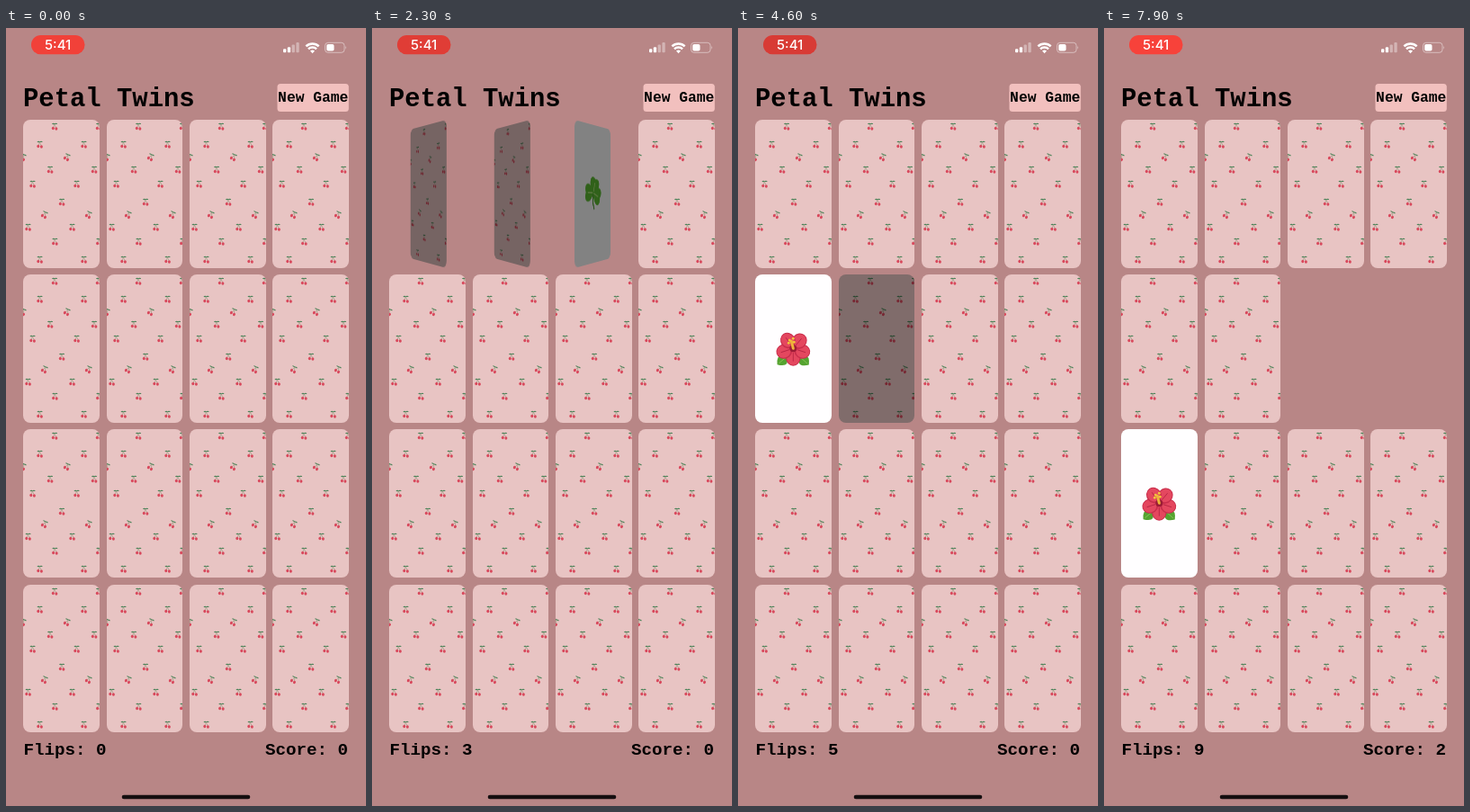
These frames come from a looping animation (400x865 px, 8000 ms). An HTML page:

```html
<!DOCTYPE html>
<html lang="en">
<head>
<meta charset="utf-8">
<title>Petal Twins</title>
<style>
  html, body { margin: 0; width: 100%; height: 100%; overflow: hidden; background: #b88686; }
  #stage { position: absolute; left: 0; top: 0; width: 400px; height: 865px; overflow: hidden; background: #b88686; }
  svg { display: block; }
  .hud { position: absolute; left: 0; top: 0; }
  .hud text { font-family: "Courier New", "Liberation Mono", monospace; font-weight: bold; }
  .hud .clock { font: 500 15px Inter, sans-serif; fill: #fff; }
  .card { position: absolute; width: 84.7px; height: 164.5px; }
  .side { position: absolute; inset: 0; border-radius: 8px; overflow: hidden; }
  .back { background: #e8c4c3; }
  .face { background: #fffeff; }
</style>
</head>
<body>
<div id="stage">
  <svg class="hud" width="400" height="865">
    <rect id="pill" x="28" y="8" width="59.5" height="21.3" rx="10.6"/>
    <text class="clock" x="57.7" y="23.7" text-anchor="middle">5:41</text>
    <g fill="#fff">
      <rect x="308" y="23.3" width="3.3" height="4" rx="1"/>
      <rect x="312.8" y="21.2" width="3.3" height="6.1" rx="1"/>
      <g opacity=".38">
        <rect x="317.6" y="18.6" width="3.3" height="8.7" rx="1"/>
        <rect x="322.4" y="16" width="3.3" height="11.3" rx="1"/>
      </g>
      <path d="M333.4 20.4a10 10 0 0 1 14.2 0M336 23.3a6.4 6.4 0 0 1 9 0" fill="none" stroke="#fff" stroke-width="2.5"/>
      <path d="M338 25.6q2.5-2 5 0l-2.5 2.6z"/>
      <rect x="354.5" y="16.3" width="21.5" height="11" rx="3.3" fill="none" stroke="#fff" stroke-opacity=".45"/>
      <path d="M377.3 20q1.8 1.8 0 3.6z" opacity=".5"/>
      <rect x="356.2" y="18" width="8.3" height="7.6" rx="1.8"/>
    </g>
    <text x="19" y="86.5" font-size="28.9">Petal Twins</text>
    <rect x="301.5" y="62" width="79.3" height="31" rx="3.5" fill="#f2c0be"/>
    <text x="341.2" y="82" font-size="16.3" text-anchor="middle">New Game</text>
    <text id="flips" x="19.5" y="807.5" font-size="19.2"></text>
    <text id="score" x="380" y="807.5" font-size="19.2" text-anchor="end"></text>
    <rect x="128.7" y="852.7" width="142.6" height="4.6" rx="2.3" fill="#150f10"/>
  </svg>
</div>
<script>
const $ = id => document.getElementById(id);
const LOOP = 8000, FLIP = 490, PRESS = 150;
const turnedUp = [400, 1000, 2000, 2700, 3800, 4700, 5300, 6200, 7200];
const MATCH = 6; // cards 6 and 7 form the matching pair

const put = (x, y, rot, body) => `<g transform="translate(${x} ${y}) rotate(${rot})">${body}</g>`;
const line = (d, color, width) =>
  `<path d="${d}" fill="none" stroke="${color}" stroke-width="${width}" stroke-linecap="round"/>`;
const dot = (x, y, rx, ry, color) => `<ellipse cx="${x}" cy="${y}" rx="${rx}" ry="${ry}" fill="${color}"/>`;
const leaf = (x, y, len, w, rot, color, vein) => put(x, y, rot,
  `<path d="M0 0Q${len * .4} ${-w} ${len} 0Q${len * .4} ${w} 0 0" fill="${color}"/>` +
  line(`M1 0H${len * .8}`, vein, .7));
const green = (x, y, len, w, rot) => leaf(x, y, len, w, rot, '#55a331', '#93cf5c');
const brown = (x, y, len, w, rot) => leaf(x, y, len, w, rot, '#b9701c', '#6e3a12');

function herb() {
  const sprigs = [[-5, 9, 14, 11, 190], [-1, 5, 18, 12, 209], [5, -2, 17, 11, 230],
    [-5, 9, 11, 11, 68], [0, 5, 18, 12, 42], [6, -3, 14, 11, 18], [10, -8, 14, 10, -58]];
  return line('M-14 17Q1 8 11 -10', '#477f24', 1.4) + sprigs.map(s => green(...s)).join('');
}

function tulip() {
  return line('M0 2Q1 10 0 18', '#5d9b3a', 2.4) +
    green(-1, 18, 21, 8, 228) + green(1, 18, 21, 8, -48) +
    '<path d="M-12 -16Q-7 -17 -5 -14Q0 -22 5 -14Q8 -17 12 -16Q13 -2 8 2Q0 6 -8 2Q-13 -2 -12 -16" fill="#e2566f"/>' +
    '<path d="M0 -18Q9 -8 4 3Q0 5 -4 3Q-9 -8 0 -18" fill="#f1808f"/>' +
    line('M-8 -11Q-9 -3 -4 2M8 -11Q9 -3 4 2', '#c23653', .8);
}

function clover() {
  const lobe = '<path d="M0 0C-17 -7 -11 -23 0 -17C11 -23 17 -7 0 0" fill="#5fbf33"/>' +
    line('M0 -2V-12', '#a9e276', 1.8);
  return line('M-2 0Q-3 11 1 18', '#4c9b2c', 2.2) +
    [-88, 18, 112].map(r => put(-1, -1, r, lobe)).join('');
}

function rice() {
  // Each ear bends from the stalk through a corner point to its tip.
  const ears = [[16, -19, 18, 8, 17], [9, -13, 11, 6, 13], [-1, -11, 2, 0, 8]];
  const grains = ears.map(([cx, cy, ex, ey, n]) => {
    let body = line(`M-13 17Q-13 -4 -6 ${cy + 4}Q${cx} ${cy} ${ex} ${ey}`, '#b3a04a', .9);
    for (let i = 0; i <= n; i++) {
      const u = i / n, v = 1 - u;
      const x = -6 * v * v + 2 * cx * u * v + ex * u * u;
      const y = (cy + 4) * v * v + 2 * cy * u * v + ey * u * u;
      body += put(x, y, 95 * u + (i % 2 ? 25 : -25), dot(0, 0, 2.4, 1.3, i % 3 ? '#dfa33a' : '#bb7d27'));
    }
    return body;
  });
  return grains.join('') + green(-15, 19, 27, 4, -103) + green(-14, 19, 19, 4, -75) + green(-15, 19, 34, 4, -89);
}

function hibiscus() {
  const petal = dot(0, -10.5, 8.2, 9, '#c92e4c') + dot(0, -11, 7, 7.6, '#e4475f') +
    line('M0 -5V-14', '#b32241', .8);
  return green(-7, 9, 14, 12, 140) + green(7, 9, 14, 12, 42) +
    [180, 108, 252, 40, -34].map(r => put(0, 0, r, petal)).join('') +
    dot(0, 0, 4, 4, '#9c1c36') + line('M0 0L-2 -8', '#efb43a', 3) +
    [[-4, -9], [0, -11], [1, -7], [-5, -6]].map(([x, y]) => dot(x, y, 1.4, 1.4, '#f3c53b')).join('');
}

function autumn() {
  return line('M-6 -16Q-1 -18 1 -14M-5 -16Q-7 -11 -7 -8M-4 -16Q-5 -6 -2 0', '#9a5a1c', 1.1) +
    leaf(-4, -15, 13, 9, 28, '#d99a32', '#a0601c') + brown(-4, -10, 20, 16, 130) + brown(-5, -2, 31, 19, 39);
}

function cherries() {
  const fruit = line('M-1.6 1L0 -3L1.8 1.4', '#84906f', .5) +
    dot(-1.3, -3.5, 1.6, .65, '#4b8358') + dot(1.5, -3.6, 1.6, .65, '#4b8358') +
    dot(-1.7, 1.4, 1.5, 1.75, '#d8485c') + dot(1.9, 1.9, 1.5, 1.75, '#d8485c');
  const rows = [[35, 8], [18.5, 28], [-.5, 42], [30, 56], [10.5, 72], [43, 92],
    [23.5, 106], [5.5, 120], [35.3, 136], [18.5, 156]];
  return rows.map(([x, y], r) => [0, 49].map(dx =>
    put(x + dx, y, r == 2 || r == 6 ? 24 : 0, fruit)).join('')).join('');
}

const leaves = autumn(), flower = hibiscus();
const pictures = [herb(), tulip(), clover(), rice(), flower, tulip(), leaves, leaves, flower];
const pattern = cherries();
const svg = (box, body) => `<svg width="84.7" height="164.5" viewBox="${box}">${body}</svg>`;

const cards = Array.from({ length: 16 }, (_, i) => {
  const el = document.createElement('div');
  el.className = 'card';
  el.style.left = 19.3 + i % 4 * 92.3 + 'px';
  el.style.top = 102.2 + (i >> 2) * 172.1 + 'px';
  el.innerHTML = `<div class="side back">${svg('0 0 84.7 164.5', pattern)}</div>` +
    `<div class="side face">${svg('-42.35 -82.25 84.7 164.5', pictures[i] || '')}</div>`;
  $('stage').append(el);
  return el;
});

const ease = u => (u = Math.min(1, Math.max(0, u)), u * u * (3 - 2 * u));

function pose(side, angle, shown, light) {
  const depth = 42.35 * Math.abs(Math.sin(angle));
  side.style.visibility = shown ? 'visible' : 'hidden';
  side.style.transform = depth < .01 ? 'none' :
    `perspective(480px) translateZ(${-depth}px) rotateY(${angle}rad)`;
  side.style.filter = light < .999 ? `brightness(${light})` : 'none';
}

function drawCard(el, i, t) {
  const up = turnedUp[i] ?? Infinity, down = turnedUp[(i | 1) + 1] ?? Infinity;
  const matched = i >> 1 == MATCH >> 1;
  el.style.display = matched && t >= down ? 'none' : '';
  const p = ease((t - up) / FLIP) - (matched ? 0 : ease((t - down) / FLIP));
  const pressed = t >= up - PRESS && t < up;
  const light = pressed ? .55 : 1 - .49 * Math.min(1, 1.2 * Math.sin(Math.PI * p));
  pose(el.children[0], -Math.PI * p, p < .5, light);
  pose(el.children[1], Math.PI * (1 - p), p >= .5, light);
}

function draw(t) {
  cards.forEach((el, i) => drawCard(el, i, t));
  $('flips').textContent = 'Flips: ' + turnedUp.filter(at => at <= t).length;
  $('score').textContent = 'Score: ' + (t >= turnedUp[MATCH + 1] ? 2 : 0);
  const glow = .5 + .5 * Math.cos((t - 5600) * Math.PI / 1000);
  $('pill').setAttribute('fill', `rgb(${216 + 39 * glow} ${59 + 9 * glow} ${53 + 6 * glow})`);
}

const start = performance.now();
function tick() {
  draw((performance.now() - start) % LOOP);
  requestAnimationFrame(tick);
}
tick();
</script>
</body>
</html>
```
